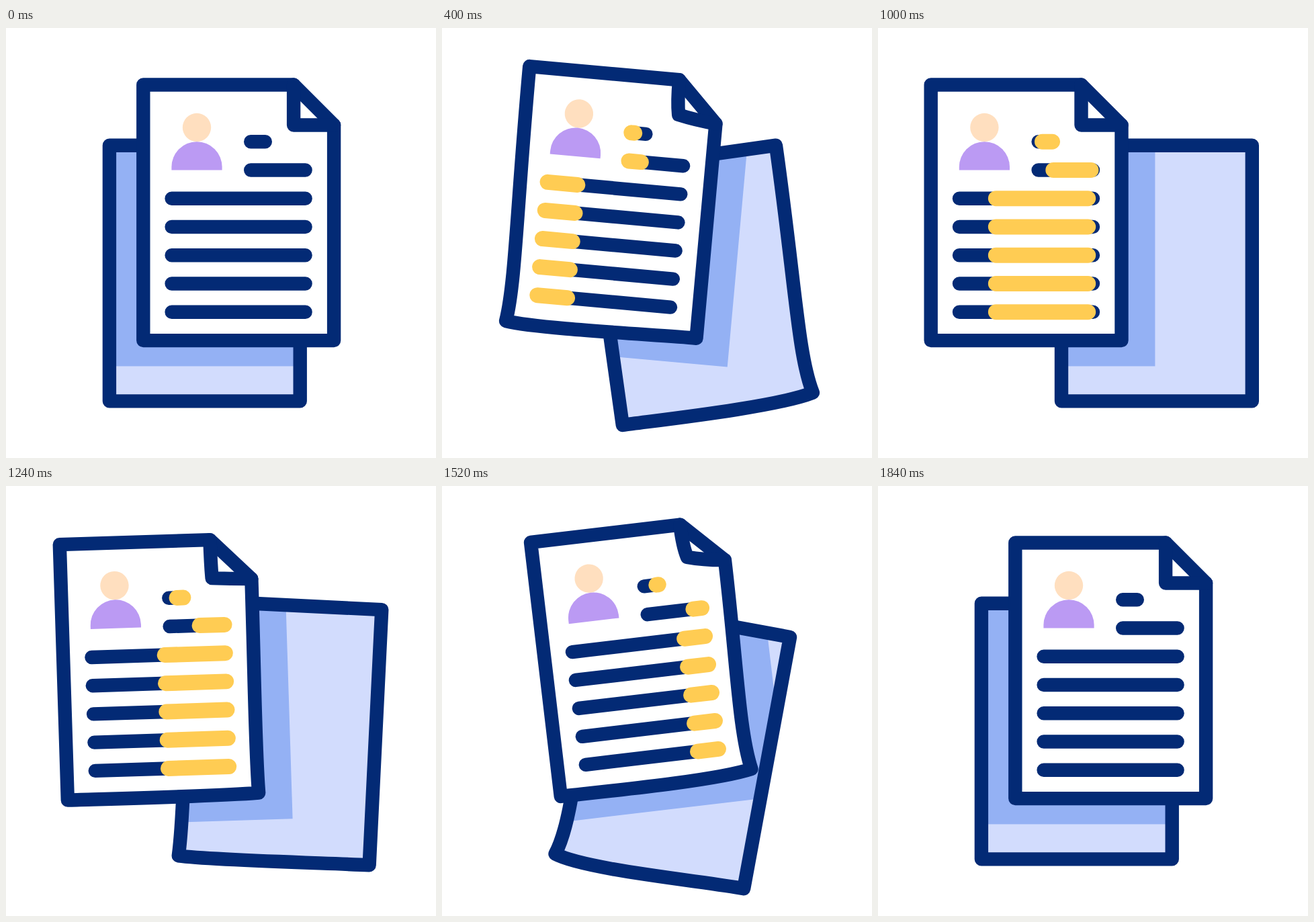
These frames come from a looping animation (640 by 640 pixels, 2 s). An HTML page:

```html
<!DOCTYPE html>
<html lang="en">
<head>
<meta charset="utf-8">
<title>Swapping pages</title>
<style>
  html, body { margin: 0; width: 100%; height: 100%; overflow: hidden; background: #fff; }
  svg { display: block; width: 100%; height: 100%; }
  .ink { fill: none; stroke: #032a75; stroke-width: 20.4; stroke-linejoin: round; stroke-linecap: round; }
  .mark { fill: none; stroke: #ffcc53; stroke-width: 23; stroke-linecap: round; }
</style>
</head>
<body>
<svg viewBox="0 0 640 640">
  <clipPath id="sheet"><path id="sheetEdge"/></clipPath>
  <g id="back">
    <path id="backFill" fill="#d2dcfd"/>
    <g clip-path="url(#sheet)">
      <rect id="shadow" x="-500" y="-500" width="691.8" height="728.6" fill="#94b1f4"/>
    </g>
    <path id="backEdge" class="ink"/>
  </g>
  <g id="front">
    <path id="frontEdge" class="ink" style="fill:#fff"/>
    <path id="fold" class="ink"/>
    <circle cx="-62.2" cy="-126.8" r="21.2" fill="#ffdfbf"/>
    <path d="M-99.8 -63.2V-68A37.6 37.6 0 0 1 -24.6 -68V-63.2Z" fill="#bb9af3"/>
    <path id="lines" class="ink"/>
    <path id="marks" class="mark"/>
  </g>
</svg>
<script>
const W = 141.9, H = 190.3, FOLD = 60, LOOP = 2000, STEP = 40;
const $ = id => document.getElementById(id);
const clamp = x => Math.min(1, Math.max(0, x));
const mix = (a, b, k) => a + (b - a) * k;
const smooth = x => x * x * (3 - 2 * x);
const span = (t, from, to) => clamp((t - from) / (to - from));
const rad = deg => deg * Math.PI / 180;
const draw = (id, d) => $(id).setAttribute('d', d);
const move = (id, m) => $(id).setAttribute('transform', m);

// Cubic-bezier easing (c, 0, 1 - c, 1)
function ease(x, c) {
  let lo = 0, hi = 1;
  for (let i = 0; i < 24; i++) {
    const u = (lo + hi) / 2, v = 1 - u;
    const at = 3 * u * v * v * c + 3 * u * u * v * (1 - c) + u * u * u;
    if (at < x) lo = u; else hi = u;
  }
  return smooth(lo);
}

// Sheet outline; the bottom corner on the raised side curls with the tilt
function outline(tilt, cut) {
  const r = Math.max(0, -tilt), l = Math.max(0, tilt);
  const a = rad(1.7 * r), b = rad(1.7 * l);
  const rx = W + 0.4 * r, ry = H - 1.05 * r;
  const lx = -W - 0.15 * l, ly = H;
  return `M${-W} ${-H}H${W - cut}L${W} ${cut - H}` +
    `C${W} 20 ${rx - 60 * Math.sin(a)} ${ry - 60 * Math.cos(a)} ${rx} ${ry}` +
    `C${rx - 60 * Math.cos(a)} ${ry + 60 * Math.sin(a)} ` +
    `${lx + 50 * Math.cos(b)} ${ly + 50 * Math.sin(b)} ${lx} ${ly}` +
    `C${lx + 60 * Math.sin(b)} ${ly - 60 * Math.cos(b)} ${-W} 20 ${-W} ${-H}Z`;
}

function foldEdge(tilt) {
  const f = 1.6 * Math.abs(tilt), x = W - FOLD, y = FOLD - H;
  return `M${x} ${-H}Q${x} ${y - 25 - f * 0.3} ${x + f * 0.45} ${y - f}` +
    `Q${W - 30} ${y - f * 0.3} ${W} ${y}`;
}

// Text lines: [start x, end x], top to bottom
const long = [-99.6, 99.4];
const rows = [[18, 39.6], [18, 99.4], long, long, long, long, long];
const bars = (from, to) => rows.map(([a, b], i) => {
  const y = -105.6 + 42.25 * i;
  return `M${mix(a, b, from)} ${y}H${mix(a, b, to)}`;
}).join('');

function pose(t) {
  const out = t < 840;
  const x = out ? span(t, 80, 560) : span(t, 1120, 1840);
  const p = ease(x, out ? 0.3 : 0.42);
  const side = out ? p : 1 - p;
  const swing = smooth(1 - Math.abs(2 * x - 1)) * (out ? 1 : -1);
  const lift = Math.pow(Math.max(0, 4 * p * (1 - p)), out ? 1 : 1.5);
  return {
    front: { x: mix(346.2, 220.6, side), y: 274.8 - 19.6 * lift, tilt: 7 * swing },
    back: { x: mix(295.8, 414.9, side), y: 365.1 + 22.5 * lift, tilt: -10.8 * swing }
  };
}

function render(t) {
  const { front, back } = pose(t);
  const place = o => `translate(${o.x} ${o.y}) rotate(${o.tilt})`;

  move('front', place(front));
  draw('frontEdge', outline(front.tilt, FOLD));
  draw('fold', foldEdge(front.tilt));

  move('back', place(back));
  const sheet = outline(back.tilt, 0);
  ['sheetEdge', 'backFill', 'backEdge'].forEach(id => draw(id, sheet));
  // The shadow follows the front page inside the back page
  move('shadow', `rotate(${-back.tilt}) translate(${-back.x} ${-back.y}) ${place(front)}`);

  const from = smooth(span(t, 560, 1840)), to = smooth(span(t, 80, 1120));
  draw('marks', to > from ? bars(from, to) : '');
}

function tick() {
  // The motion runs on 25 poses a second
  const t = Math.floor((performance.now() + 8) / STEP) * STEP % LOOP;
  render(t);
  requestAnimationFrame(tick);
}

draw('lines', bars(0, 1));
tick();
</script>
</body>
</html>
```
